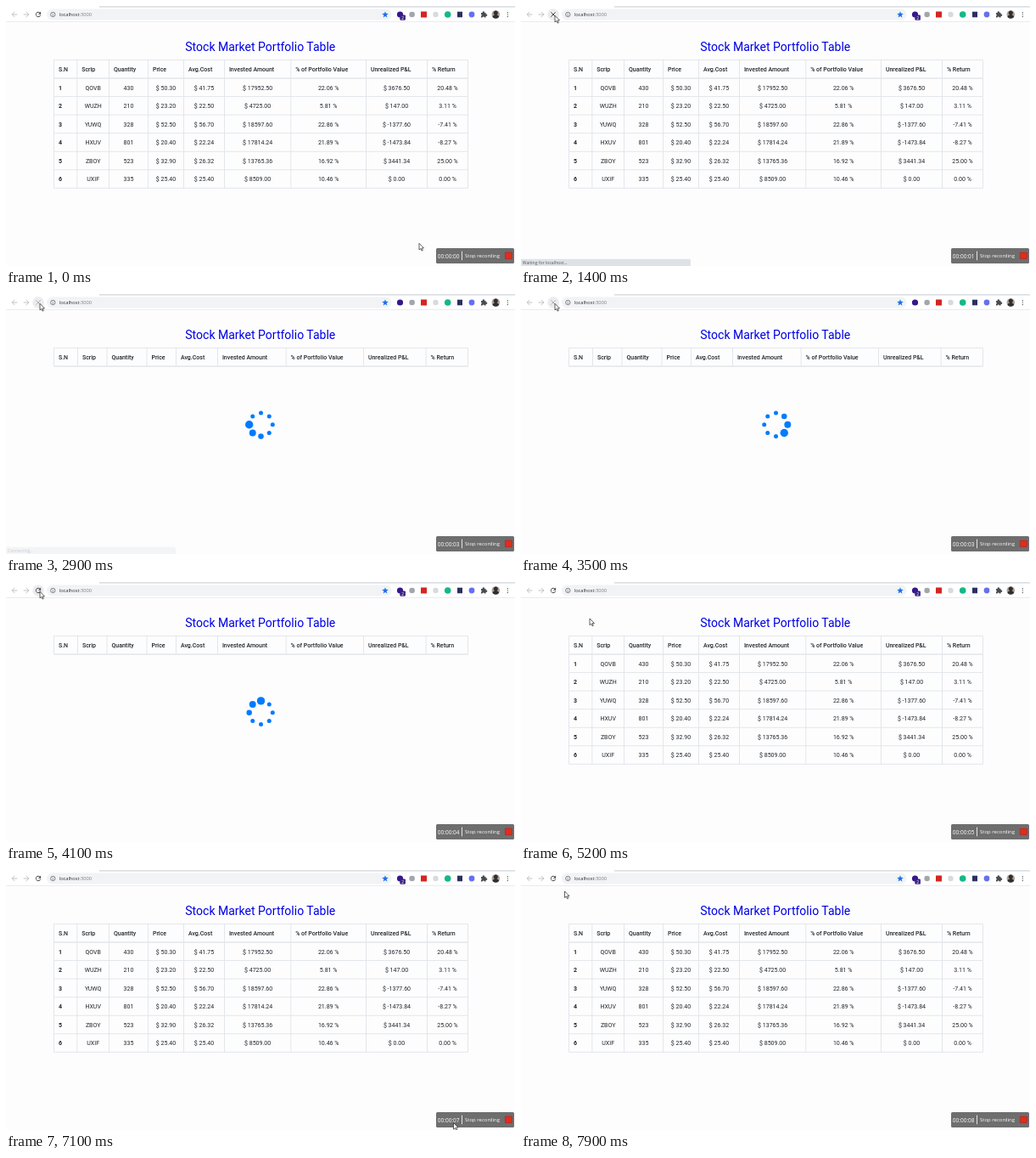
Animation, 600 px wide and 306 px high, one loop 8 s. Source, as an HTML page:

```html
<!DOCTYPE html>
<html lang="en">
<head>
<meta charset="utf-8">
<title>Portfolio table</title>
<style>
  html, body { margin: 0; width: 100%; height: 100%; overflow: hidden; background: #fdfdfe; }
  svg { display: block; width: 100vw; height: 100vh; }
  text { white-space: pre; }
  .page { font: 7.03px Roboto, sans-serif; fill: #212529; }
  .title { font-size: 14.03px; fill: #0000e6; }
  .head, .num { font-weight: 500; }
  .num { font-weight: 700; }
  .cell { text-anchor: middle; }
  .grid { stroke: #e3e6ea; fill: none; }
  .ui { font-family: "Open Sans", "Noto Sans", sans-serif; }
  .line { fill: none; stroke-linecap: round; stroke-linejoin: round; }
</style>
</head>
<body>
<svg viewBox="0 0 600 306">
  <rect width="600" height="306" fill="#fdfdfe"/>

  <g class="page">
    <g id="tableArea">
      <text class="title" x="211.3" y="52.8">Stock Market Portfolio Table</text>
      <g id="loaded"></g>
      <g id="loading"></g>
    </g>
    <g id="spinner" fill="#007bff"></g>
  </g>

  <g class="ui">
    <rect width="600" height="18.5" fill="#fff"/>
    <rect x="110" width="490" height="1.8" fill="#dee1e6"/>
    <path d="M0 18.5H600" stroke="#e6e8ea" stroke-width=".8"/>
    <g class="line" stroke="#b9bcc0" stroke-width=".9">
      <path d="M13 10H7.2M10 7.2L7.2 10L10 12.8"/>
      <path d="M21 10H26.8M24 7.2L26.8 10L24 12.8"/>
    </g>
    <circle id="hover" cx="38" cy="10" r="6.8" fill="#ebecee"/>
    <g id="reload">
      <path class="line" d="M40.2 8.1A2.8 2.8 0 1 0 40.7 11" stroke="#46494d" stroke-width="1"/>
      <path d="M41.1 6.6V9.7H38Z" fill="#46494d"/>
    </g>
    <path id="stop" class="line" d="M35.6 7.6L40.4 12.4M40.4 7.6L35.6 12.4" stroke="#46494d" stroke-width="1"/>
    <rect x="48" y="3.5" width="406.5" height="13" rx="6.5" fill="#f1f3f4"/>
    <circle cx="55.3" cy="10" r="2.7" fill="none" stroke="#55595e" stroke-width=".7"/>
    <path d="M55.3 9.6V11.6M55.3 8.2V8.8" stroke="#55595e" stroke-width=".7"/>
    <text x="62.7" y="12.1" font-size="5.7" fill="#2b2e32">localhost<tspan fill="#777b80">:3000</tspan></text>
    <path id="star" fill="#1a73e8"/>

    <circle cx="464.5" cy="10" r="3.6" fill="#35188c"/>
    <g id="badge">
      <rect x="464.3" y="10.6" width="6.6" height="6.2" rx="1.2" fill="#3a2383"/>
      <text x="467.6" y="15.6" font-size="5" fill="#fff" text-anchor="middle">2</text>
    </g>
    <circle cx="478.6" cy="10" r="3.3" fill="#a3a6ab"/>
    <rect id="redTool" x="489" y="6.5" width="7" height="7"/>
    <circle cx="506.5" cy="10" r="3.2" fill="#d9dadc"/>
    <circle cx="520.7" cy="10" r="3.8" fill="#15b886"/>
    <rect x="532" y="6.7" width="6" height="6.6" fill="#2b2f63"/>
    <circle cx="549" cy="10" r="3.4" fill="#6670ee"/>
    <path d="M560 8H561.7A1.3 1.3 0 1 1 564.1 8H565.6V9.5A1.3 1.3 0 1 1 565.6 12V13.4H563.9A1.2 1.2 0 0 0 561.6 13.4H560V11.8A1.2 1.2 0 0 0 560 9.6Z" fill="#4a4d52"/>
    <circle cx="577.3" cy="10" r="4.8" fill="#a9a4a0"/>
    <path d="M573.4 12.8Q574 10.8 576 10.4A2.6 2.6 0 1 1 578.6 10.4Q580.6 10.8 581.2 12.8A4.8 4.8 0 0 1 573.4 12.8Z" fill="#332d2b"/>
    <g fill="#55595e"><circle cx="591.3" cy="7.7" r=".7"/><circle cx="591.3" cy="10.1" r=".7"/><circle cx="591.3" cy="12.5" r=".7"/></g>

    <g id="status">
      <path d="M0 297.7H198Q200 297.7 200 299.7V306H0Z" fill="#dee1e6"/>
      <text id="statusText" x="1.8" y="304.4" font-size="5.1" fill="#55595e"></text>
    </g>

    <rect x="507" y="285" width="92" height="18" rx="1.5" fill="#6e6e6e"/>
    <g fill="#fff">
      <text id="timer" x="508.8" y="296.5" font-size="6.5"></text>
      <rect x="537" y="288.6" width=".8" height="10.6"/>
      <text x="541" y="296.3" font-size="6">Stop recording</text>
    </g>
    <rect x="588.5" y="290" width="8" height="7.6" fill="#e32b1d" stroke="#9e2a20" stroke-width=".6"/>
  </g>

  <path id="cursor" d="M0 0V7.7L1.8 6.1L3 8.8L4.3 8.2L3.1 5.6H5.5Z" fill="#fff" stroke="#222" stroke-width=".7" stroke-linejoin="round"/>
</svg>

<script>
const LOOP = 8000, STEP = 100;
const $ = id => document.getElementById(id);
const show = (id, on) => $(id).setAttribute('visibility', on ? 'visible' : 'hidden');

const heads = ['S.N', 'Scrip', 'Quantity', 'Price', 'Avg.Cost', 'Invested Amount',
  '% of Portfolio Value', 'Unrealized P&amp;L', '% Return'];
const rows = [
  'QOVB|430|$ 50.30|$ 41.75|$ 17952.50|22.06 %|$ 3676.50|20.48 %',
  'WUZH|210|$ 23.20|$ 22.50|$ 4725.00|5.81 %|$ 147.00|3.11 %',
  'YUWQ|328|$ 52.50|$ 56.70|$ 18597.60|22.86 %|$ -1377.60|-7.41 %',
  'HXUV|801|$ 20.40|$ 22.24|$ 17814.24|21.89 %|$ -1473.84|-8.27 %',
  'ZBOY|523|$ 32.90|$ 26.32|$ 13765.36|16.92 %|$ 3441.34|25.00 %',
  'UXIF|335|$ 25.40|$ 25.40|$ 8509.00|10.46 %|$ 0.00|0.00 %'
].map(row => row.split('|'));

const label = (kind, x, y, s) => `<text class="${kind}" x="${x}" y="${y}">${s}</text>`;

function table(edges, data) {
  const top = 63.5, rowH = 21.55;
  const bottom = top + rowH * (data.length + 1);
  let lines = edges.map(x => `M${x} ${top}V${bottom}`).join('');
  for (let i = 0; i <= data.length + 1; i++) lines += `M56.5 ${top + rowH * i}H544.5`;
  let out = `<path class="grid" d="${lines}"/><path class="grid" d="M56.5 85.1H544.5"/>`;
  heads.forEach((h, i) => out += label('head', edges[i] + 5.4, 76.8, h));
  data.forEach((row, r) => {
    const y = 98.5 + rowH * r;
    out += label('num', 61.9, y, r + 1);
    row.forEach((s, c) => out += label('cell', (edges[c + 1] + edges[c + 2]) / 2, y, s));
  });
  return out;
}

$('loaded').innerHTML = table([56.5, 83.8, 121.5, 167.5, 209.5, 257.5, 335.8, 424.5, 496.5, 544.5], rows);
$('loading').innerHTML = table([56.5, 84.5, 119, 166, 200.5, 249.5, 330.2, 421.5, 495.2, 544.5], []);

$('star').setAttribute('d', 'M' + Array.from({ length: 10 }, (_, i) => {
  const a = i * Math.PI / 5, r = i % 2 ? 1.7 : 4;
  return `${447 + r * Math.sin(a)} ${10.2 - r * Math.cos(a)}`;
}).join('L') + 'Z');

$('spinner').innerHTML = Array.from({ length: 8 }, (_, i) => {
  const a = i * Math.PI / 4;
  return `<circle cx="${300.5 + 13.8 * Math.sin(a)}" cy="${153.7 - 13.8 * Math.cos(a)}"/>`;
}).join('');
const dots = [...$('spinner').children];

// time, x, y
const path = [
  [0, 487, 279.3], [100, 440, 251], [200, 280, 158], [300, 119, 62],
  [800, 24, 6], [900, 33, 9], [1100, 40, 11.3], [5100, 40, 11.3],
  [5200, 81, 43], [5400, 190, 110], [5700, 420, 238], [6000, 526, 287],
  [6200, 525, 281.5], [6600, 527.5, 297], [7000, 527.5, 297], [7100, 527.5, 297.5],
  [7300, 440, 248], [7500, 250, 140], [7700, 95, 50], [7900, 51.5, 25]
];
const timerTicks = [600, 1500, 2600, 3600, 4700, 5700, 6600, 7600];

function cursorAt(t) {
  const n = path.findIndex(p => p[0] > t);
  if (n < 0) return path[path.length - 1].slice(1);
  const [t0, x0, y0] = path[n - 1], [t1, x1, y1] = path[n];
  const k = (t - t0) / (t1 - t0);
  return [x0 + (x1 - x0) * k, y0 + (y1 - y0) * k];
}

function dotRadius(lag) {
  if (lag < 3) return 4.7 - 0.73 * lag;
  return 2.5 + 2.2 * Math.max(0, lag - 7);
}

function draw(t) {
  const within = (a, b) => t >= a && t < b;
  const blank = within(1800, 2200), waiting = within(2200, 4300);

  show('tableArea', !blank);
  show('loaded', !blank && !waiting);
  show('loading', waiting);
  show('spinner', waiting);
  if (waiting) {
    const head = 6 + (t - 2900) / 120;
    dots.forEach((dot, i) => dot.setAttribute('r', dotRadius(((head - i) % 8 + 8) % 8)));
  }

  const busy = within(1400, 4000);
  show('reload', !busy);
  show('stop', busy);
  $('stop').setAttribute('opacity', t < 2800 ? 1 : 0.35);
  show('hover', within(900, 5200));
  show('badge', !within(1800, 4000));
  $('redTool').setAttribute('fill', blank ? '#dcdddf' : '#d3271f');

  show('status', within(1400, 3000));
  $('status').setAttribute('opacity', t < 2800 ? 1 : t < 2900 ? 0.65 : 0.3);
  $('statusText').textContent = t < 1800 ? 'Waiting for localhost...' : 'Connecting...';
  $('timer').textContent = '00:00:0' + timerTicks.filter(tick => t >= tick).length;

  show('cursor', !within(400, 800));
  $('cursor').setAttribute('transform', `translate(${cursorAt(t)})`);
}

const start = performance.now();
function frame(now) {
  let t = Math.floor(Math.max(0, now - start) % LOOP / STEP) * STEP;
  if (t === 3800 || t === 4200) t -= STEP; // the screen holds for two steps here
  draw(t);
  requestAnimationFrame(frame);
}
frame(start);
</script>
</body>
</html>
```
